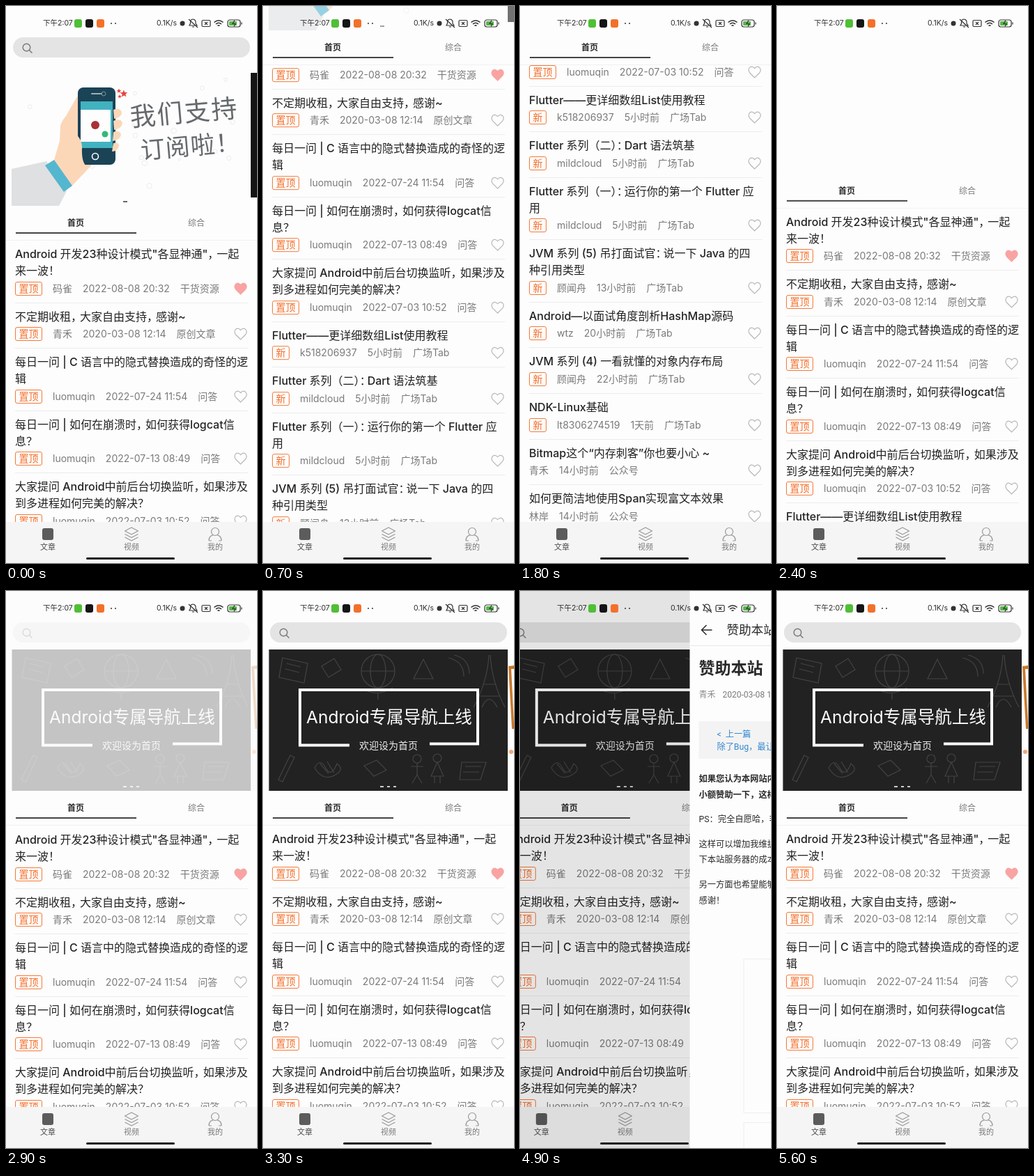
An HTML page that plays this animation: 360 px wide and 800 px high, repeating every 5700 ms.

```html
<!DOCTYPE html>
<html lang="zh-CN">
<head>
<meta charset="utf-8">
<title>Article list</title>
<style>
html, body { margin: 0; width: 100%; height: 100%; overflow: hidden; background: #fdfdfd; }
#stage { position: absolute; left: 0; top: 0; width: 360px; height: 800px; overflow: hidden; background: #fdfdfd;
  font: 14px/20px Inter, "Noto Sans CJK SC", "Noto Sans CJK", sans-serif; color: #222; }
#stage div, #stage svg { position: absolute; }
.t { white-space: pre; line-height: 20px; }
.page { left: 0; top: 0; width: 360px; height: 800px; overflow: hidden; background: #fdfdfd; }
#clip { left: 0; width: 360px; overflow: hidden; height: 660px; }
#list { left: 0; top: 0; width: 360px; }
.item { left: 0; width: 360px; }
.title { left: 13px; top: 7px; font-size: 16px; line-height: 24px; font-weight: 500; white-space: pre; }
.title i { font-style: normal; margin-right: -5px; }
.title i.comma { margin-right: -3px; }
.meta { left: 13px; bottom: 11px; display: flex; gap: 15px; color: #7a7a7a; white-space: pre; }
.badge { box-sizing: border-box; height: 20px; line-height: 17px; padding: 0 4.5px; border: 1.4px solid #f5793a;
  border-radius: 3px; color: #f56c26; font-weight: 500; }
.line { left: 13px; width: 334px; bottom: 0; height: 1px; background: #ececec; }
#head { left: 0; top: 0; width: 360px; height: 337px; background: #fdfdfd; overflow: hidden; }
#scrim { left: 0; top: 0; width: 360px; height: 289px; background: #fdfdfd; }
#article { font-family: Roboto, "Noto Sans CJK SC", "Noto Sans CJK", sans-serif; }
.card { box-sizing: border-box; left: 77px; width: 208px; height: 222px; border: 1px solid #eee; }
</style>
</head>
<body>
<div id="stage">
  <div id="home" class="page">
    <div id="clip"><div id="list"></div></div>
    <div id="head">
      <div style="left:10px;top:45px;width:340px;height:29px;border-radius:15px;background:#e4e4e4"></div>
      <svg style="left:22px;top:52px" width="17" height="17" fill="none" stroke="#777" stroke-width="1.4"><circle cx="7.5" cy="7.5" r="5.3"/><path d="M11.5 11.5l4 4"/></svg>

      <svg id="slide1" style="left:0;top:84px" width="360" height="203" viewBox="0 84 360 203">
        <g id="specks" fill="none" stroke="#ececec"></g>
        <path fill="#dfe0e2" d="M8 234L58 223L87 266L76 287H8Z"/>
        <path fill="#fbd7b8" d="M67 228L77 194L78 172Q80 165 86 158L102 130L125 150V226L113 239L95 258Z"/>
        <path fill="#55b6cf" d="M56 229L69 221L95 258L83 267Z"/>
        <rect x="103" y="117" width="54" height="111" rx="8" fill="#1b4356"/>
        <path fill="#42b2c0" d="M107 137H153V204H107Z"/>
        <path fill="#fdfdfd" d="M107 149H150V195H107Z"/>
        <path stroke="#9bb0b8" stroke-width="2" stroke-linecap="round" d="M123 126H137"/>
        <circle cx="140" cy="126" r="3" fill="none" stroke="#7e969e"/>
        <circle cx="128" cy="171" r="6" fill="#a83236"/>
        <circle cx="142" cy="184" r="4.5" fill="#35b777"/>
        <circle cx="128" cy="216" r="4.5" fill="none" stroke="#fdfdfd" stroke-width="1.6"/>
        <path fill="#fbd7b8" d="M154 149Q164 145 166 153Q166 160 155 162ZM154 165Q165 161 167 168Q166 176 155 178ZM154 181Q164 178 165 185Q163 193 153 194ZM154 197Q162 195 162 201Q160 209 152 209Z"/>
        <path fill="#fbd7b8" d="M94 180Q108 187 109 202Q108 226 116 230L101 241L86 225Z"/>
        <path id="stars" fill="#e8433f"/>
        <g fill="#666a6d" font-weight="500" font-size="37" letter-spacing="2">
          <text transform="translate(179 173) rotate(-5)">我们支持</text>
          <text transform="translate(194 220) rotate(-5)" font-size="35" letter-spacing="1">订阅啦！</text>
        </g>
        <path stroke="#666" stroke-width="2" d="M168 281h6"/>
      </svg>

      <svg id="slide2" style="left:0;top:84px" width="360" height="203" viewBox="0 84 360 203">
        <path fill="#222" d="M8.500 84H351V287H8.500Z"/>
        <g fill="none" stroke="#434343" stroke-width="1.2">
          <circle cx="165" cy="115" r="24"/><ellipse cx="165" cy="115" rx="11" ry="24"/><path d="M141 115H189M146 142Q165 152 186 139M165 146V156"/>
          <path d="M324 92Q322 130 302 167M326 92Q328 130 347 167M316 134H334M310 151H340M314 167Q324 144 336 167"/>
          <path d="M28 96l36 8l-5 28l-36 -8zM34 104l20 5M32 112l20 5M84 108l18 -11l10 16l-18 11z"/>
          <path d="M74 254q8 -15 16 0t16 -6q10 7 1 14q-20 14 -33 -8M82 248l12 14M92 245l10 16M22 271l17 -35l6 3l-17 35z"/>
          <circle cx="221" cy="241" r="6"/><path d="M221 247v17M212 252h18M221 264l-7 12M221 264l7 12"/>
          <circle cx="250" cy="240" r="6"/><path d="M250 246l-9 20h18zM246 266v10M254 266v10"/>
          <path d="M285 246h35l-8 25h-30zM290 252h23M287 260h23M145 251l18 -8l14 14l-18 9zM230 98l14 28h-28zM266 96q22 5 22 27M274 92q22 5 22 27"/>
        </g>
        <path fill="none" stroke="#fdfdfd" stroke-width="4" d="M124 221.500H53V142H308V219.500H239"/>
        <text x="62" y="190" font-size="24.500" fill="#fdfdfd">Android专属导航上线</text>
        <text x="138" y="227" font-size="14" fill="#eee">欢迎设为首页</text>
        <path stroke="#ccc" stroke-width="2" d="M168 281h5M178 281h4M187 281h4"/>
      </svg>

      <svg style="left:351px;top:96px" width="9" height="179">
        <rect id="nextDark" width="9" height="179" fill="#141414"/>
        <g id="nextLight"><path fill="#c9792c" d="M1 12L9 11V16H5L9 94V102L6 102Z"/><circle cx="5" cy="135" r="3" fill="#f2a578"/></g>
      </svg>
      <div id="scrim"></div>
      <div style="left:0;top:336px;width:360px;height:1px;background:#f0f0f0"></div>
      <div style="left:14px;top:324.500px;width:173px;height:2px;background:#444"></div>
    </div>
    <div id="remnant" style="left:351px;top:20px;width:9px;height:14px;background:#333"></div>
    <div id="nav" style="left:0;top:741px;width:360px;height:59px;background:#f5f5f5">
      <div style="left:52px;top:9px;width:16px;height:17px;border-radius:3px;background:#5c5c5c"></div>
      <svg style="left:168px;top:6px" width="144" height="24" fill="none" stroke="#999" stroke-width="1.2" stroke-linejoin="round">
        <path d="M12 2l9.500 5l-9.500 5l-9.500 -5zM2.500 11.500l9.500 5l9.500 -5M2.500 16l9.500 5l9.500 -5"/>
        <circle cx="132" cy="8" r="5.500"/><path d="M123 21q0 -7 6 -8M141 21q0 -7 -6 -8M123 21h4M137 21h4"/>
      </svg>
    </div>
  </div>
  <div id="dim" class="page" style="background:#000"></div>

  <div id="article" class="page">
    <svg style="left:15px;top:46px" width="335" height="20" fill="none" stroke="#2a2a2a" stroke-width="1.500">
      <path d="M2 10H17M9 3L2 10L9 17"/>
      <g fill="#2a2a2a" stroke="none"><circle cx="324" cy="4" r="2"/><circle cx="324" cy="10" r="2"/><circle cx="324" cy="16" r="2"/></g>
    </svg>
    <div style="left:0;top:78px;width:360px;height:1px;background:#e8e8e8"></div>
    <div style="left:357px;top:78px;width:3px;height:468px;background:#b8b8b8"></div>
    <div style="left:13px;top:187px;width:334px;height:54px;background:#f3f3f3"></div>
    <div class="card" style="top:528px"></div>
    <div class="card" style="top:763px"></div>
    <div style="left:164px;top:623px;width:35px;height:36px;border-radius:3px;background:#7fc0da"></div>
  </div>

  <div id="status" style="left:0;top:0;width:360px;height:37px">
    <svg style="left:96px;top:15px" width="250" height="20" fill="none" stroke="#333" stroke-width="1.200">
      <g stroke="none"><rect x="2" y="4" width="11" height="12" rx="3" fill="#4fbf35"/><rect x="18" y="4" width="11" height="12" rx="3" fill="#151515"/><rect x="34" y="4" width="11" height="12" rx="3" fill="#f3702b"/>
      <g fill="#333"><circle cx="55" cy="10" r="1"/><circle cx="61" cy="10" r="1"/><circle cx="157" cy="10" r="3.500"/></g></g>
      <path d="M167 13h11l-2 -3v-3q-1 -3 -4 -3q-3 0 -3.500 3v3zM171 15h3M166 4l13 12"/>
      <rect x="185" y="5.500" width="12" height="9" rx="1.500"/><path d="M189 8l4 4M193 8l-4 4"/>
      <path stroke-width="1.600" d="M202.500 8.500q6.500 -5.500 13 0M205 11q4 -3.500 8 0M207.500 13.500q1.500 -1.500 3 0"/>
      <rect x="222" y="5" width="18" height="10" rx="3"/><rect x="224" y="7" width="11" height="6" rx="1" fill="#55b948" stroke="none"/><path d="M232 5.500l-3 5h4l-2 4M242 8.500v3"/>
    </svg>
  </div>
  <div id="strip" style="left:0;top:787px;width:360px;height:13px;background:#fdfdfd"></div>
  <div style="left:115px;top:791.500px;width:127px;height:3.500px;border-radius:2px;background:#1c1c1c"></div>
</div>

<script>
const LOOP = 5700, STEP = 100, COLLAPSE = 252;
const $ = id => document.getElementById(id);
const tighten = s => s.replace(/[：！]/g, '<i>$&</i>').replace(/，/g, '<i class="comma">，</i>');

function text(parent, x, y, str, size, color, css = '') {
  const el = document.createElement('div');
  el.className = 't';
  el.style.cssText = `left:${x}px;top:${y - 10}px;font-size:${size}px;color:${color};${css}`;
  el.textContent = str;
  $(parent).append(el);
}
const mid = 'transform:translateX(-50%);';
const right = 'transform:translateX(-100%);';

const pinned = '置顶', fresh = '新', square = '广场Tab', qa = '问答';
const items = [
  ['Android 开发23种设计模式"各显神通"，一起\n来一波！', pinned, '码雀', '2022-08-08 20:32', '干货资源'],
  ['不定期收租，大家自由支持，感谢~', pinned, '青禾', '2020-03-08 12:14', '原创文章'],
  ['每日一问 | C 语言中的隐式替换造成的奇怪的逻\n辑', pinned, 'luomuqin', '2022-07-24 11:54', qa],
  ['每日一问 | 如何在崩溃时，如何获得logcat信\n息？', pinned, 'luomuqin', '2022-07-13 08:49', qa],
  ['大家提问 Android中前后台切换监听，如果涉及\n到多进程如何完美的解决？', pinned, 'luomuqin', '2022-07-03 10:52', qa],
  ['Flutter——更详细数组List使用教程', fresh, 'k518206937', '5小时前', square],
  ['Flutter 系列（二）：Dart 语法筑基', fresh, 'mildcloud', '5小时前', square],
  ['Flutter 系列（一）：运行你的第一个 Flutter 应\n用', fresh, 'mildcloud', '5小时前', square],
  ['JVM 系列 (5) 吊打面试官：说一下 Java 的四\n种引用类型', fresh, '顾闻舟', '13小时前', square],
  ['Android—以面试角度剖析HashMap源码', fresh, 'wtz', '20小时前', square],
  ['JVM 系列 (4) 一看就懂的对象内存布局', fresh, '顾闻舟', '22小时前', square],
  ['NDK-Linux基础', fresh, 'lt8306274519', '1天前', square],
  ['Bitmap这个“内存刺客”你也要小心 ~', '', '青禾', '14小时前', '公众号'],
  ['如何更简洁地使用Span实现富文本效果', '', '林岸', '14小时前', '公众号']
];
let top0 = 0;
$('list').innerHTML = items.map(([title, badge, ...info], i) => {
  const h = title.includes('\n') ? 89.5 : 65.6, y = top0;
  top0 += h;
  const heart = i ? 'fill="none" stroke="#b8b8b8"' : 'fill="#f9a3a3" stroke="#f9a3a3"';
  return `<div class="item" style="top:${y}px;height:${h}px">
    <div class="title">${tighten(title)}</div>
    <div class="meta">${badge && `<span class="badge">${badge}</span>`}${info.map(s => `<span>${s}</span>`).join('')}</div>
    <svg style="left:327px;bottom:11px" width="20" height="20" ${heart} stroke-width="1.2"><path d="M9.500 18L2.500 11Q-.5 7 2.300 3.500Q6 .5 9.500 4.500Q13 .5 16.700 3.500Q19.500 7 16.500 11Z"/></svg>
    <div class="line"></div></div>`;
}).join('');
const pressed = $('list').children[1];

const ink = '#2a2a2a', soft = '#7a7a7a', link = '#3488d0', page = 'article';
text('head', 100, 312, '首页', 12, ink, mid + 'font-weight:700');
text('head', 273, 312, '综合', 12, soft, mid);
['文章', '视频', '我的'].forEach((s, i) => text('nav', 60 + 120 * i, 36, s, 11, i ? soft : '#4a4a4a', mid));
text('status', 53, 25, '下午2:07', 10.5, ink);
text('status', 216, 25, '0.1K/s', 10.5, ink);

text(page, 53, 56, '赞助本站-拾Codebay - shico...', 17.5, ink, 'font-weight:500;font-family:Inter,"Noto Sans CJK SC",sans-serif');
text(page, 13, 112, '赞助本站', 23, ink, 'font-weight:700');
text(page, 13, 149, '青禾', 12, '#8c8c8c');
text(page, 47, 149, '2020-03-08 12:14', 12, soft);
text(page, 39, 206, '<  上一篇', 12.2, link);
text(page, 39, 224, '除了Bug，最让你头...', 12.2, link);
text(page, 321, 206, '下一篇  >', 12.2, link, right);
text(page, 321, 224, '我们更新了一个新的...', 12.2, link, right);
[
  [270, '如果您认为本网站内容对你确实有帮助，或者喜欢本站，不妨', 700],
  [293, '小额赞助一下，这样可以减轻一下我个人承担的压力。', 700],
  [328, 'PS：完全自愿哈，非常感谢。'],
  [364, '这样可以增加我维护本站、每日一问等模块的动力，也能补贴'],
  [386, '下本站服务器的成本；'],
  [422, '另一方面也希望能够不断提高服务器配置从而提供更多功能，'],
  [445, '感谢！']
].forEach(([y, s, w = 400]) => text(page, 13, y, s, 12.25, ink, `font-weight:${w}`));
text(page, 181, 556, '蓝讯', 15.2, ink, mid + 'font-weight:500');
text(page, 181, 728, '感谢赞助本站', 15.2, ink, mid + 'font-weight:500');
text(page, 173, 786, '集付通', 15.2, ink, mid + 'font-weight:500');

// Faint marks around the first banner
let seed = 7;
const rnd = () => (seed = seed * 16807 % 2147483647) / 2147483647;
$('specks').innerHTML = Array.from({ length: 26 }, () =>
  `<circle cx="${15 + rnd() * 330}" cy="${96 + rnd() * 178}" r="${1.5 + rnd() * 2.5}"/>`).join('');

const star = (cx, cy, r) => 'M' + Array.from({ length: 10 }, (_, i) => {
  const a = i * Math.PI / 5 - 1.6, q = i % 2 ? r * .45 : r;
  return `${cx + q * Math.cos(a)} ${cy + q * Math.sin(a)}`;
}).join('L') + 'Z';
$('stars').setAttribute('d', star(162, 122, 3.5) + star(169, 126, 5.5) + star(163, 130, 3));

// Each row: time, value; the move towards a row eases out
const scroll = [[300, 0], [1000, 353], [1200, 353], [1800, 645], [2000, 645], [2600, 0], [2700, -12], [2900, -1], [3000, 0]];
const fade = [[500, 0], [1000, 1], [2700, 1], [2900, .74], [3200, 0]];
const cover = [[3700, 0], [4050, 1], [4750, 1], [5150, 0]];
const easeOut = p => 1 - (1 - p) ** 2.4;
const linear = p => p;

function at(rows, t, ease) {
  const i = rows.findIndex(r => t < r[0]);
  if (i < 0) return rows[rows.length - 1][1];
  if (!i) return rows[0][1];
  const [t0, a] = rows[i - 1], [t1, b] = rows[i];
  return a + (b - a) * ease((t - t0) / (t1 - t0));
}
const show = (id, on) => { $(id).style.display = on ? '' : 'none'; };

function draw(t) {
  const s = at(scroll, t, easeOut), off = Math.max(0, Math.min(s, COLLAPSE));
  $('head').style.transform = `translateY(${-off}px)`;
  $('clip').style.top = 337 - off + 'px';
  $('list').style.transform = `translateY(${off - s}px)`;
  $('scrim').style.opacity = at(fade, t, linear);

  const second = t >= 1500;
  show('slide1', !second);
  show('nextDark', !second);
  show('slide2', second);
  show('nextLight', second);
  show('remnant', t >= 1000 && t < 1200);
  pressed.style.background = t >= 3600 && t < 3900 ? '#f0f0f0' : '';

  const c = at(cover, t, easeOut);
  $('home').style.transform = `translateX(${-90 * c}px)`;
  $('dim').style.opacity = .3 * c;
  $('article').style.transform = `translateX(${360 * (1 - c)}px)`;
  show('strip', c > .99);
}

const begin = performance.now();
function tick() {
  const t = (performance.now() - begin) % LOOP;
  draw(Math.floor(t / STEP) * STEP);
  requestAnimationFrame(tick);
}
draw(0);
tick();
</script>
</body>
</html>
```
